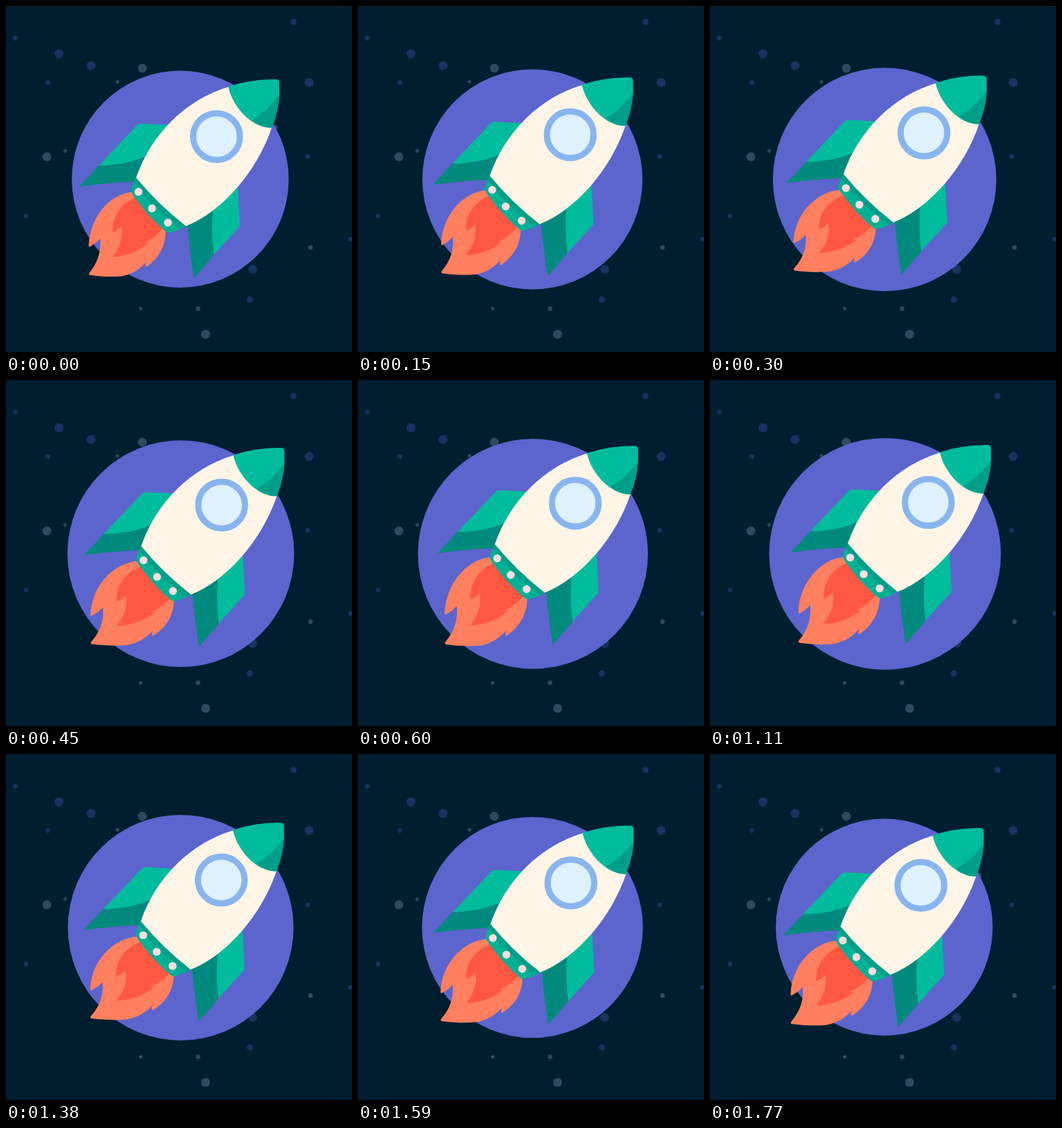
Recreate the animation shown at these times as an HTML page. Size 500 px wide and 500 px high, loop 1800 ms.

```html
<!DOCTYPE html>
<html lang="en">
<head>
<meta charset="utf-8">
<title>Rocket</title>
<style>
html, body { margin: 0; width: 100%; height: 100%; overflow: hidden; background: #001e30; }
svg { display: block; width: 100%; height: 100%; }
.dots { fill: none; stroke-linecap: round; }
.grey { stroke: #2f4a5e; }
.blue { stroke: #18335f; }
.small { stroke-width: 5px; }
.medium { stroke-width: 6.7px; }
.large { stroke-width: 13px; }
.light { fill: #00bc9d; }
.shade { fill: #009e88; }
.dark { fill: #008a7d; }
</style>
</head>
<body>
<svg viewBox="0 0 500 500">
  <rect width="500" height="500" fill="#001e30"/>
  <g class="dots">
    <path class="grey small" d="M85.500 209.500h0M161 109.500h0M194.500 437.500h0"/>
    <path class="grey medium" d="M277.500 437.500h0M440 349h0M389 175h0"/>
    <path class="grey large" d="M59 218h0M197 90h0M288.500 474.500h0"/>
    <path class="blue medium" d="M13.500 46.500h0M60.500 110.500h0M436 217.500h0M29 303.500h0M498 337h0"/>
    <path class="blue large" d="M76.500 69h0M123 86h0M438 110.500h0M356.500 380.500h0"/>
    <path class="blue" stroke-width="9" d="M415.500 23h0M352.500 424h0"/>
  </g>
  <circle id="planet" fill="#5c65cd"/>
  <g id="rocket">
    <g id="flame">
      <path fill="#ff7f5e" d="M200 267Q190 268 181 269C156 271 122 298 119.500 346Q119.500 349 122 347.500Q130 343 136 336C138 358 130 374 120.500 385.500Q118.500 388.500 122 389C142 391.500 156 391.500 167 390.500C183 388 195 379 203 369Q201 374 201.500 376Q203 378 207 374C222 362 231 346 231 322L215 290Z"/>
      <path fill="#ff5742" d="M200 270Q190 275 184 278C163 288 153 308 154.500 327Q161 325 166.500 318C170 334 164 350 155 361Q155 363 158 362.500C178 361 195 352 205 343L199 343C212 337 222 328 228 319L215 290Z"/>
    </g>
    <path class="light" d="M134 230.500L189 172.500Q191 170 194 170L235 172L205 240Z"/>
    <path class="dark" d="M105.500 261L134 230.500Q173 230 203 217L195 254L186 254Q150 255 105.500 261Z"/>
    <path class="light" d="M285 290L335 262L338 318L300 360Z"/>
    <path class="dark" d="M262 316L299 294Q296 330 300.500 360L271.500 393.500Q265.500 352 262 316Z"/>
    <path fill="#00b094" d="M189 247C184 256 181 262 180.500 267Q181 270 184 274Q205 304 230 325Q234 329 239 327Q251 324 262 317L230 270Z"/>
    <path class="shade" d="M188 248L230 270L260 318L253 321Q212 291 185 254Z"/>
    <path fill="#fff5e6" d="M321 117C261 135 210 184 188 248Q219 286 260 318C313 297 363 238 384 176L360 130Z"/>
    <path class="light" d="M321 116.500Q355 105 391 106Q394.500 106.500 395 110Q397 143 384 176C356 177 328 147 321 116.500Z"/>
    <path class="shade" d="M395.300 128Q378 152 355 165Q369 176 384 176Q394 152 395.300 128Z"/>
    <circle cx="304.300" cy="188.700" r="33.800" fill="#def1ff" stroke="#88b5ee" stroke-width="9"/>
    <path class="dots" stroke="#fbdfe0" stroke-width="11.400" d="M191.500 268.500h0M211 292.500h0M234 313h0"/>
  </g>
</svg>
<script>
const LOOP = 1800;
const PEAK = 900;
const END = 1770;
const [planet, rocket, flame] = ["planet", "rocket", "flame"].map(id => document.getElementById(id));

function draw(t) {
  const p = t / LOOP;
  const turn = 2 * Math.PI * p;

  // The planet and the rocket rise together at a steady rate, then fall back.
  const rise = t < PEAK ? t / PEAK : Math.max(0, (END - t) / (END - PEAK));
  planet.setAttribute("cx", 251.8 + 1.5 * rise);
  planet.setAttribute("cy", 250.3 + 1.4 * rise);
  planet.setAttribute("r", 156.7 + 14.2 * rise);
  rocket.setAttribute("transform", `translate(${14.3 * rise + 0.5 * p} ${p - 16.5 * rise})`);

  // The flame breathes in width and flickers in height, with a jump where the loop restarts.
  const arc = Math.sin(turn / 2);
  const width = 1.06 - 0.025 * Math.cos(2 * turn) + 0.035 * (2 * p - 1) ** 5;
  const height = 1 + 0.06 * arc * Math.cos(3 * turn);
  flame.setAttribute("transform",
    `translate(175 ${331 + arc}) scale(${width} ${height}) translate(-175 -331)`);
}

const start = performance.now();
function tick() {
  draw((performance.now() - start) % LOOP);
  requestAnimationFrame(tick);
}
draw(0);
requestAnimationFrame(tick);
</script>
</body>
</html>
```
